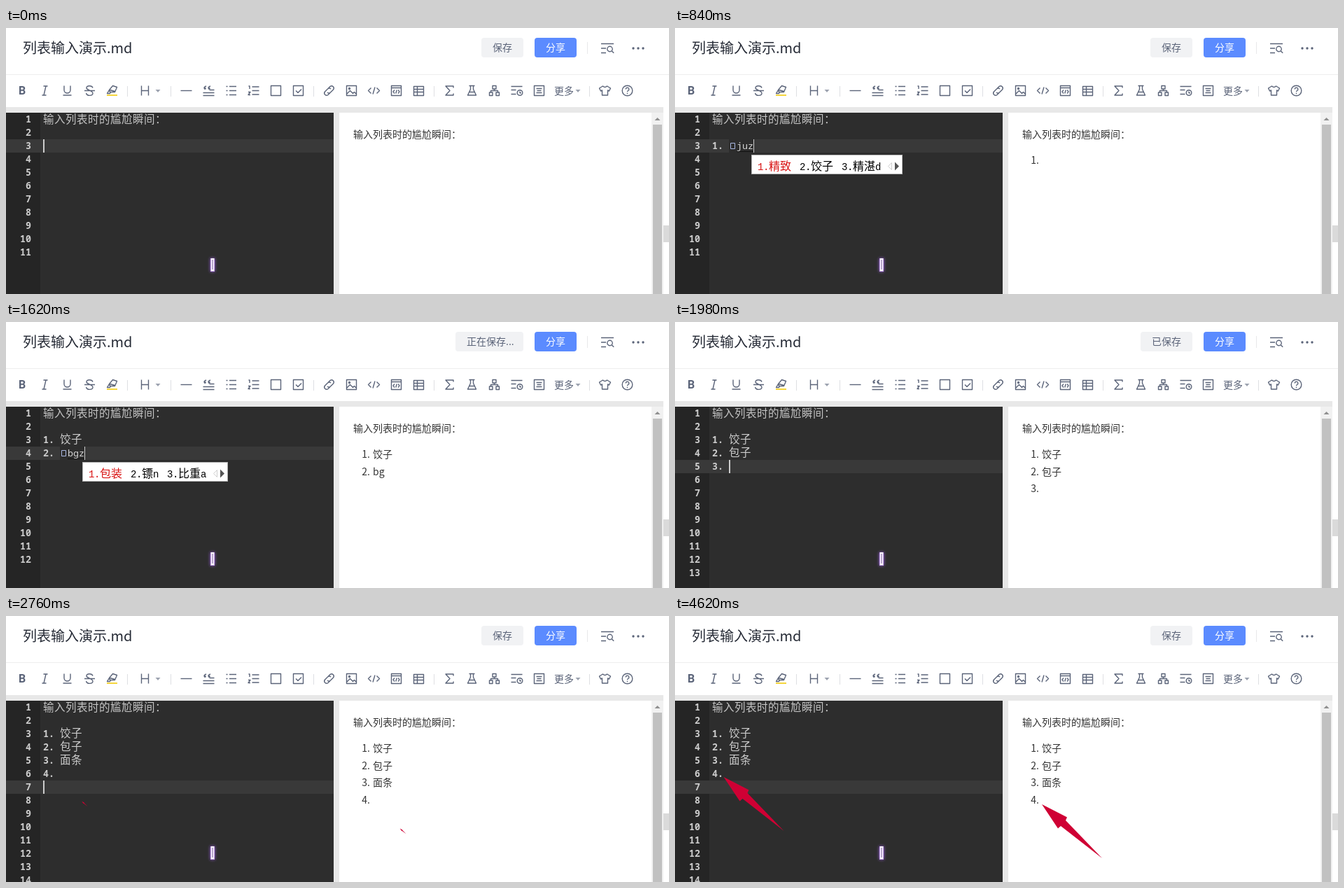
Write an HTML page with a canvas that moves like this. It is 947 px wide and 380 px high and loops after 4.8 s.

```html
<!DOCTYPE html>
<html lang="zh-CN">
<head>
<meta charset="utf-8">
<style>
html, body { margin: 0; width: 100%; height: 100%; overflow: hidden; background: #fff; }
canvas { display: block; }
</style>
</head>
<body>
<canvas id="stage" width="947" height="380"></canvas>
<script>
const ctx = document.getElementById('stage').getContext('2d');
const LOOP = 4800, STEP = 60, ROW = 19, TOP = 121;
const SANS = '"Noto Sans CJK SC", "Noto Sans CJK", sans-serif';
const MONO = '"Noto Sans Mono", "DejaVu Sans Mono", monospace';
const INK = '#5b6479';

// Each entry changes part of the editor state from its time on.
const TIMELINE = [
  [0, { lines: [''], comp: '', cand: null, list: [], save: '保存' }],
  [60, { lines: ['1'] }],
  [120, { lines: ['1.'] }],
  [240, { lines: ['1. '] }],
  [300, { list: [''] }],
  [420, { comp: 'j', cand: ['就', '将', '及'], more: true }],
  [540, { comp: 'ju', cand: ['句', '据', '局'] }],
  [780, { comp: 'juz', cand: ['精致', '饺子', '精湛d'] }],
  [900, { lines: ['1. 饺子'], comp: '', cand: null }],
  [960, { list: ['饺子'] }],
  [1020, { lines: ['1. 饺子', '2. '] }],
  [1080, { list: ['饺子', ''] }],
  [1260, { comp: 'b', cand: ['不', '把', '被'] }],
  [1380, { comp: 'bg', cand: ['包', '報', '宝'], list: ['饺子', 'b'] }],
  [1500, { save: '正在保存...' }],
  [1560, { comp: 'bgz', cand: ['包装', '镖n', '比重a'], list: ['饺子', 'bg'] }],
  [1740, { lines: ['1. 饺子', '2. 包子'], comp: '', cand: null }],
  [1800, { list: ['饺子', '包子'], save: '已保存' }],
  [1920, { lines: ['1. 饺子', '2. 包子', '3. '] }],
  [1980, { list: ['饺子', '包子', ''] }],
  [2160, { comp: 'm', cand: ['吗', '没', '面'] }],
  [2220, { comp: 'mp', cand: ['面条', '面汤d', '面团l'], more: false }],
  [2280, { list: ['饺子', '包子', 'm'] }],
  [2400, { lines: ['1. 饺子', '2. 包子', '3. 面条'], comp: '', cand: null, save: '保存' }],
  [2460, { list: ['饺子', '包子', '面条'] }],
  [2520, { lines: ['1. 饺子', '2. 包子', '3. 面条', '4. '] }],
  [2640, { list: ['饺子', '包子', '面条', ''] }],
  [2760, { lines: ['1. 饺子', '2. 包子', '3. 面条', '4. ', ''] }]
];

const stateAt = t => Object.assign({}, ...TIMELINE.filter(([at]) => at <= t).map(e => e[1]));
const isWide = ch => ch.charCodeAt(0) > 0x2000;
const cellWidth = text => [...text].reduce((w, ch) => w + (isWide(ch) ? 16 : 8), 0);

function rect(x, y, w, h, color) {
  ctx.fillStyle = color;
  ctx.fillRect(x, y, w, h);
}

function text(str, x, y, font, color, align = 'left') {
  ctx.font = font;
  ctx.fillStyle = color;
  ctx.textAlign = align;
  ctx.fillText(str, x, y);
}

function cells(str, x, y, color, weight = 600) {
  for (const ch of str) {
    const wide = isWide(ch);
    text(ch, x, y, wide ? `300 15.5px ${SANS}` : `${weight} 13.33px ${MONO}`, color);
    x += wide ? 16 : 8;
  }
}

function button(x, w, label, fill, color) {
  ctx.fillStyle = fill;
  ctx.beginPath();
  ctx.roundRect(x, 14, w, 28, 4);
  ctx.fill();
  text(label, x + 16, 33, `14px ${SANS}`, color);
}

function icon(x, y, path, color = INK, width = 1.4) {
  ctx.save();
  ctx.translate(x, y);
  ctx.strokeStyle = color;
  ctx.lineWidth = width;
  ctx.lineJoin = 'round';
  ctx.stroke(new Path2D(path));
  ctx.restore();
}

function shape(x, y, path, color, scale = 1) {
  ctx.save();
  ctx.translate(x, y);
  ctx.scale(scale, scale);
  ctx.fillStyle = color;
  ctx.fill(new Path2D(path));
  ctx.restore();
}

const circle = (x, y, r) => `M${x + r} ${y}a${r} ${r} 0 1 0 ${-2 * r} 0a${r} ${r} 0 1 0 ${2 * r} 0`;
const box = (x, y, w, h) => `M${x} ${y}h${w}v${h}h${-w}z`;
const FRAME = box(-7, -7, 14, 14);

const ICONS = [
  [55, 'M-2 -6.5h6M-4 6.5h6M1.5 -6.5l-3 13'],
  [87, 'M-4.5 -7v6a4.5 4.5 0 0 0 9 0v-6M-6 6.5h12'],
  [119, 'M4.5 -4C3 -8 -5 -7.5 -4.5 -3.5C-4 -1 4.5 0 4.5 3.5C4.5 8 -4 8 -5 3.5M-7.5 0h15'],
  [151, 'M-4 -1L1 -7L7 -5L4 2L-3 2zM-4 -1l-3 5h4l1 -2M-3 -1l7 2'],
  [198, 'M-5 -7v14M5 -7v14M-5 0h10'],
  [257, 'M-8 0h16'],
  [289, 'M1 -1h7M-8 3h16M-8 7h16M-3.5 -6.5q-3 1 -3 3h2v1h-2M2.5 -6.5q-3 1 -3 3h2v1h-2'],
  [321, 'M-7 -6h2M-7 0h2M-7 6h2M-2.5 -6h10M-2.5 0h10M-2.5 6h10'],
  [353, 'M-7 -6.5h1.5v4M-7.5 2h3l-3 4h3M-2 -5.5h10M-2 0h10M-2 5.5h10'],
  [385, FRAME],
  [417, FRAME + 'M-3.5 0l3 3l5 -5'],
  [461, 'M-1.5 -3l3 -3a3.2 3.2 0 0 1 4.5 4.5l-4 4a3.2 3.2 0 0 1 -4.5 0M1.5 3l-3 3a3.2 3.2 0 0 1 -4.5 -4.5l4 -4a3.2 3.2 0 0 1 4.5 0'],
  [493, box(-7, -7, 14, 14) + 'M-7 5l5 -5l4 4l2 -2l3 3' + circle(-3, -3, 1)],
  [525, 'M-4 -4l-4 4l4 4M4 -4l4 4l-4 4M1.5 -5l-3 10'],
  [557, FRAME + 'M-7 -4h14M-2.5 -1l-2 2.5l2 2.5M2.5 -1l2 2.5l-2 2.5M.7 -1l-1.4 5'],
  [589, box(-7, -6, 14, 13) + 'M-7 -2h14M-7 2h14M-2 -6v13'],
  [633, 'M5.5 -4v-2.5h-11l6 6.5l-6 6.5h11v-2.5'],
  [665, 'M-4 -7h8M-2 -7v5l-4 8.5h12l-4 -8.5v-5M-4 2h8'],
  [697, box(-2.5, -7, 5, 4.5) + box(-7, 2.5, 4.5, 4.5) + box(2.5, 2.5, 4.5, 4.5) + 'M0 -2.5v2.5M-5 2.5v-2.5h10v2.5'],
  [729, 'M-8 -6h16M-8 -1h7M-8 5h7' + circle(4.5, 3, 3.8) + 'M4.5 1v2.3h2'],
  [761, FRAME + 'M-4 -3h8M-3 0h6M-4 3h8'],
  [855, 'M-3 -6.5q3 3 6 0l5 3l-2 4l-2 -1v7h-8v-7l-2 1l-2 -4z'],
  [887, circle(0, 0, 7.3) + 'M-2.3 -2a2.3 2.3 0 1 1 3.4 2q-1.1 .6 -1.1 1.8M0 3.2v1.6']
];

function drawHeader(save) {
  text('列表输入演示.md', 24, 36, `20px ${SANS}`, '#262b36');
  const width = { '保存': 60, '已保存': 74, '正在保存...': 97 }[save];
  button(739 - width, width, save, '#f1f2f4', INK);
  button(755, 60, '分享', '#5b8bff', '#fff');
  rect(830, 20, 1, 17, '#e8e8ea');
  icon(859, 29, 'M-9 -6.5h18M-9 0h7M-9 6.5h7' + circle(3.5, 1, 3.7) + 'M6.2 3.7l3 3');
  for (const x of [896, 903, 910]) shape(x, 29, circle(0, 0, 1.7), INK);
  rect(0, 66, 947, 1, '#eeeeee');
}

function drawToolbar() {
  text('B', 23, 95, '700 16px Roboto, sans-serif', INK, 'center');
  for (const [x, path] of ICONS) icon(x + 0.5, 89.5, path);
  rect(144, 95, 15, 2, '#f5d63d');
  for (const x of [174, 236, 440, 612, 834]) rect(x - 1, 83, 1, 15, '#dedfe3');
  for (const x of [217, 817]) shape(x, 90, 'M-3.5 -2h7l-3.5 4z', '#9da3b0');
  text('更多', 783, 95, `14px ${SANS}`, INK);
}

function drawEditor(s, caretOn) {
  const active = s.lines.length + 2;
  const y = TOP + (active - 1) * ROW;
  rect(0, TOP, 468, 259, '#2d2d2d');
  rect(0, TOP, 49, 259, '#252525');
  rect(0, y, 468, ROW, '#393939');
  for (let n = 1; n <= active + 8; n++) {
    const label = String(n);
    cells(label, 36 - label.length * 8, TOP + n * ROW - 5, '#cccccc');
  }
  cells('输入列表时的尴尬瞬间：', 53, 136, '#c4c4c4');
  s.lines.forEach((line, i) => cells(line, 53, TOP + (i + 3) * ROW - 5, '#cccccc'));

  let caret = 53 + cellWidth(s.lines[s.lines.length - 1]);
  if (s.comp) {
    const width = cellWidth(s.comp);
    rect(caret, y, width + 11, ROW, '#2d2d2d');
    icon(caret + 2.5, y + 5.5, box(0, 0, 6, 8), '#a9b8e2', 1);
    caret += 11;
    cells(s.comp, caret, y + 14, '#d4d4d4', 500);
    rect(caret, y + 17, width, 1, '#111');
    caret += width;
  }
  if (caretOn) rect(caret, y, s.comp ? 1 : 2, ROW, '#cccccc');
  if (s.cand) drawCandidates(s.cand, s.more, caret - 3, y + 22);
}

function drawCandidates(words, more, left, top) {
  const labels = words.map((word, i) => `${i + 1}.${word}`);
  const width = labels.reduce((w, label) => w + cellWidth(label) + 12, 0) + 28;
  rect(left, top, width, 28, '#b4b4b4');
  rect(left + 1, top + 1, width - 2, 26, '#fff');
  let x = left + 9;
  labels.forEach((label, i) => {
    for (const ch of label) {
      const font = isWide(ch) ? `300 16px ${SANS}` : '14px "Liberation Mono", monospace';
      text(ch, x, top + 22, font, i ? '#000' : '#d91414');
      x += isWide(ch) ? 16 : 8;
    }
    x += 12;
  });
  const end = left + width, mid = top + 16.5;
  icon(end - 20.5, mid, 'M5 -5v10l-5 -5z', '#cfcfcf', 1);
  if (more) shape(end - 11, mid, 'M0 -6v12l6 -6z', '#555');
  else icon(end - 10.5, mid, 'M0 -5v10l5 -5z', '#cfcfcf', 1);
}

function drawPreview(list) {
  const font = `14px ${SANS}`;
  text('输入列表时的尴尬瞬间：', 496, 157, font, '#333');
  list.forEach((item, i) => {
    const y = Math.round(194 + i * 24.6);
    text(`${i + 1}.`, 520, y, font, '#333', 'right');
    text(item, 524, y, font, '#333');
  });
  rect(922, TOP, 17, 259, '#f1f1f1');
  rect(924, 138, 13, 242, '#c1c1c1');
  shape(930.5, 130, 'M-4 2h8l-4 -4z', '#8f8f8f');
  rect(939, 282, 8, 24, '#dadada');
}

function drawPointer() {
  ctx.save();
  ctx.shadowColor = '#a064e6';
  ctx.shadowBlur = 4;
  rect(292, 329, 6, 19, '#c9a8ec');
  ctx.restore();
  rect(293, 329, 4, 18, '#fbf7ff');
  rect(294, 331, 2, 14, '#b9a6cc');
}

function drawArrows(t) {
  if (t < 2760) return;
  const scale = Math.min(1, 0.1 + 0.9 * (t - 2760) / 240);
  const path = 'M-43 -38.5L-7 -20L-9 -15.5L43 38.5L-16 -7.5L-20 -4z';
  shape(112.5, 268.5, path, '#cf0034', scale);
  shape(567, 307.4, path, '#cf0034', scale);
}

function caretVisible(t) {
  if (t < 2880) return true;
  return t >= 3300 && t % 300 < 120;
}

function render(time) {
  const t = Math.floor((time % LOOP) / STEP) * STEP;
  const s = stateAt(t);
  rect(0, 0, 947, 380, '#fff');
  drawHeader(s.save);
  drawToolbar();
  rect(0, 113, 939, 8, '#e8e8e8');
  rect(468, TOP, 8, 259, '#e8e8e8');
  drawPreview(s.list);
  drawEditor(s, caretVisible(t));
  drawPointer();
  drawArrows(t);
}

const start = performance.now();
function tick() {
  render(performance.now() - start);
  requestAnimationFrame(tick);
}
tick();
</script>
</body>
</html>
```
